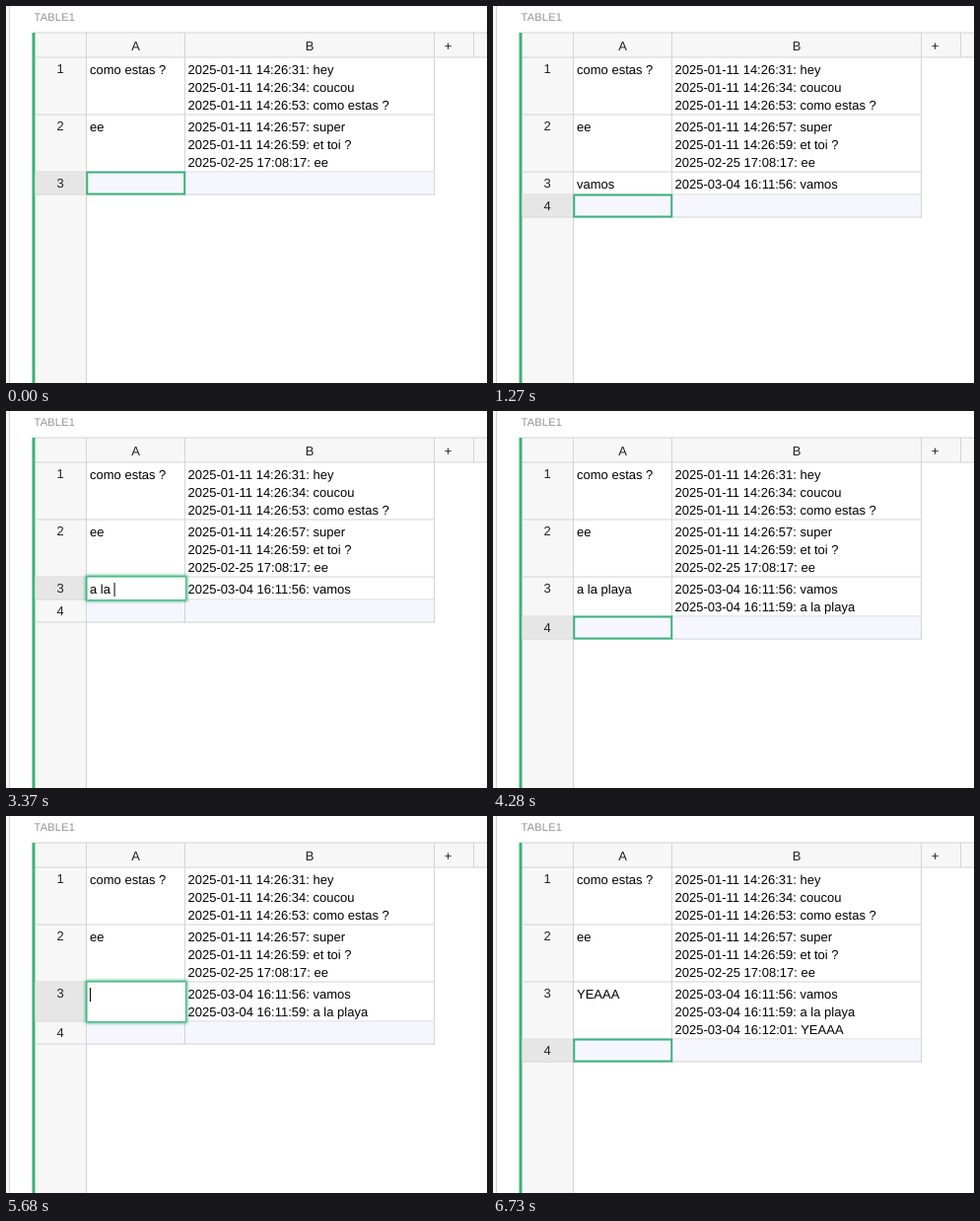
Write an HTML page that moves like this. It is 488 px wide and 382 px high and loops after 8000 ms.

```html
<!DOCTYPE html>
<html lang="en">
<head>
<meta charset="utf-8">
<title>Table with edit history</title>
<style>
  html, body { margin: 0; width: 100%; height: 100%; overflow: hidden; background: #fff; }
  svg { display: block; }
  text { font: 13px "Liberation Sans", Arial, sans-serif; fill: #000; white-space: pre; text-rendering: geometricPrecision; }
  .mid { text-anchor: middle; fill: #222; }
  .title { font-size: 11px; letter-spacing: .25px; fill: #929299; }
</style>
</head>
<body>
<svg id="stage" width="488" height="382" viewBox="0 0 488 382">
  <defs>
    <filter id="glow" x="-20%" y="-50%" width="140%" height="200%"><feGaussianBlur stdDeviation="1.5"/></filter>
  </defs>
  <g id="frame"></g>
  <g id="rows"></g>
  <g id="cursor"></g>
</svg>
<script>
const LOOP = 8000;
const GREEN = '#3bb27b', LINE = '#d4d4d4', HEAD = '#f7f7f7', ACTIVE = '#e6e6e6', FRESH = '#f6f6ff';
const TOP = 52.5, LEFT = 29, COL_A = 82, RIGHT = 435;
const TEXT_X = 85, BASELINE = 16.5, LINE_HEIGHT = 18;

const frame = document.getElementById('frame');
const rowsLayer = document.getElementById('rows');
const cursor = document.getElementById('cursor');

function add(parent, tag, attrs, content) {
  const node = document.createElementNS('http://www.w3.org/2000/svg', tag);
  for (const key in attrs) node.setAttribute(key, attrs[key]);
  if (content !== undefined) node.textContent = content;
  parent.appendChild(node);
  return node;
}
const box = (parent, x, y, width, height, fill, more) =>
  add(parent, 'rect', { x, y, width, height, fill, ...more });
const label = (parent, x, y, content, cls = '') =>
  add(parent, 'text', { x, y, class: cls }, content);

const fixedRows = [
  ['como estas ?', ['2025-01-11 14:26:31: hey', '2025-01-11 14:26:34: coucou', '2025-01-11 14:26:53: como estas ?']],
  ['ee', ['2025-01-11 14:26:57: super', '2025-01-11 14:26:59: et toi ?', '2025-02-25 17:08:17: ee']]
];
const history = ['2025-03-04 16:11:56: vamos', '2025-03-04 16:11:59: a la playa', '2025-03-04 16:12:01: YEAAA'];

// value: row 3 content (null = not created), log: history lines, sel: active row,
// edit: text in the open editor (null = closed), caret: visible or not
const closed = (sel, value, log) => ({ sel, value, log, edit: null });
const typing = (edit, caret = true) => ({ edit, caret });
const steps = [
  [0, closed(3, null, 0)],
  [500, typing('v')],
  [570, typing('va')],
  [710, typing('vam')],
  [920, typing('vamo')],
  [990, typing('vamos')],
  [1130, typing('vamos', false)],
  [1200, closed(4, 'vamos', 0)],
  [1270, closed(4, 'vamos', 1)],
  [2250, closed(3, 'vamos', 1)],
  [2670, typing('a')],
  [2740, typing('a ')],
  [2880, typing('a l')],
  [3020, typing('a la')],
  [3230, typing('a la', false)],
  [3370, typing('a la ')],
  [3580, typing('a la p')],
  [3650, typing('a la pl')],
  [3720, typing('a la pla')],
  [3860, typing('a la play')],
  [4000, typing('a la playa')],
  [4280, closed(4, 'a la playa', 2)],
  [5050, closed(3, 'a la playa', 2)],
  [5610, typing('')],
  [6030, typing('YEA')],
  [6170, typing('YEAA', false)],
  [6240, typing('YEAA')],
  [6380, typing('YEAAA')],
  [6660, typing('YEAAA', false)],
  [6730, closed(4, 'YEAAA', 3)]
];

function drawFrame() {
  box(frame, 0, 0, 3, 382, HEAD);
  box(frame, 3, 0, 1, 382, LINE);
  label(frame, 28.5, 15.3, 'TABLE1', 'title');
  box(frame, LEFT, 27, 459, 25, HEAD);
  box(frame, LEFT, 51, 52, 331, HEAD);
  box(frame, LEFT, 26.5, 459, 1, LINE);
  box(frame, LEFT, TOP - 1, 459, 1, LINE);
  box(frame, 81, 27, 1, 355, LINE);
  for (const x of [181, 434, 474]) box(frame, x, 27, 1, 25, LINE);
  box(frame, 26.5, 27, 3, 355, GREEN);
  label(frame, 131.5, 45, 'A', 'mid');
  label(frame, 308, 45, 'B', 'mid');
  label(frame, 448.5, 45, '+', 'mid');
}

const rowHeight = lines => Math.max(23, LINE_HEIGHT * lines + 4);

function drawRow(index, top, value, log, active, fresh) {
  const h = rowHeight(log.length);
  if (active) box(rowsLayer, LEFT + .5, top, 51.5, h - 1, ACTIVE);
  if (fresh) box(rowsLayer, COL_A, top, RIGHT - COL_A, h, FRESH);
  box(rowsLayer, LEFT + .5, top + h - 1, RIGHT - LEFT - .5, 1, LINE);
  for (const x of [181, 434]) box(rowsLayer, x, top, 1, h, LINE);
  label(rowsLayer, 55, top + BASELINE - 1, index, 'mid');
  label(rowsLayer, TEXT_X, top + BASELINE, value);
  log.forEach((line, i) => label(rowsLayer, 184.5, top + BASELINE + LINE_HEIGHT * i, line));
  return h;
}

function drawCursor(top, h, state) {
  box(cursor, 82.25, top, 99, h - 1, 'none', { stroke: GREEN, 'stroke-width': 2 });
  if (state.edit === null) return;
  box(cursor, 80.5, top - 2, 103.5, h + 3.5, GREEN, { filter: 'url(#glow)' });
  box(cursor, 82.5, top, 99.5, h - .5, '#fff');
  const text = label(cursor, TEXT_X, top + BASELINE, state.edit);
  if (state.caret) {
    const width = state.edit ? text.getComputedTextLength() : 0;
    box(cursor, TEXT_X + width, top + 5.5, 1, 14, '#000');
  }
}

function draw(state) {
  rowsLayer.replaceChildren();
  cursor.replaceChildren();
  const rows = fixedRows.slice();
  if (state.value !== null) rows.push([state.value, history.slice(0, state.log)]);
  rows.push(['', []]);
  let top = TOP;
  rows.forEach(([value, log], i) => {
    const active = state.sel === i + 1;
    const h = drawRow(i + 1, top, value, log, active, i === rows.length - 1);
    if (active) drawCursor(top, h, state);
    top += h;
  });
}

let shown = -1;
function render(now) {
  const t = now % LOOP;
  let last = 0;
  while (last + 1 < steps.length && steps[last + 1][0] <= t) last++;
  if (last !== shown) {
    shown = last;
    draw(Object.assign({}, ...steps.slice(0, last + 1).map(step => step[1])));
  }
}

drawFrame();
render(0);
const start = performance.now();
function tick() {
  render(performance.now() - start);
  requestAnimationFrame(tick);
}
requestAnimationFrame(tick);
</script>
</body>
</html>
```
